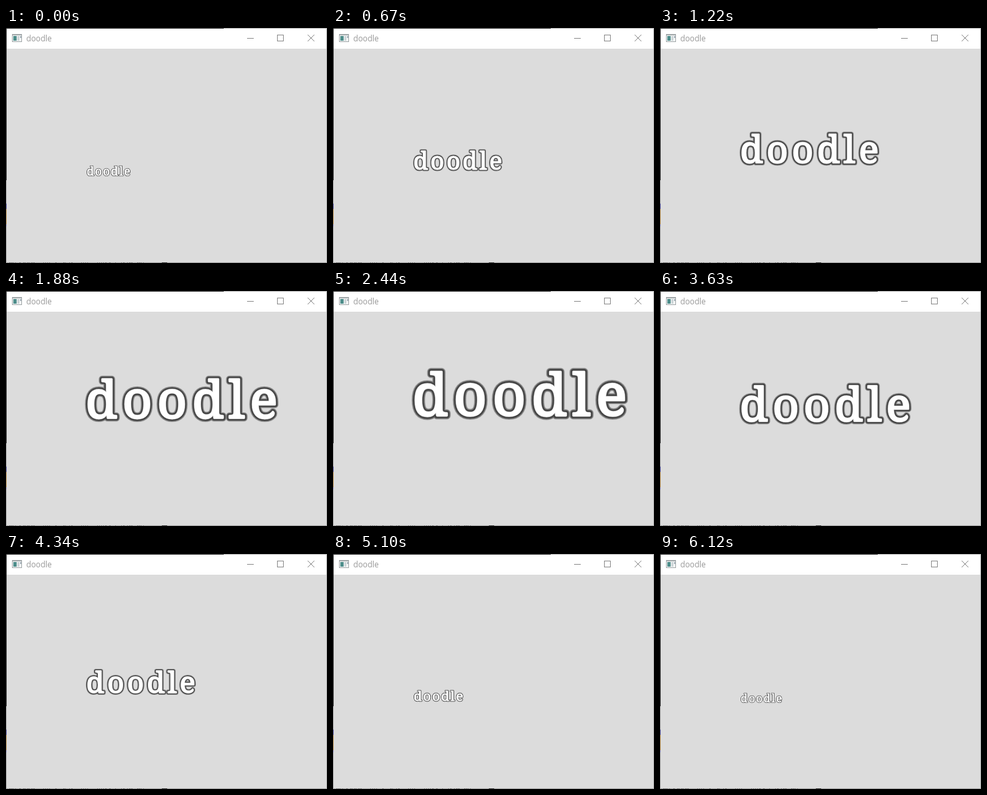
These frames come from a looping animation (482 px wide and 352 px high, 6.18 s). An HTML page with a canvas:

```html
<!DOCTYPE html>
<html lang="en">
<head>
<meta charset="utf-8">
<title>doodle</title>
<style>
  html, body { margin: 0; width: 100%; height: 100%; overflow: hidden; background: #dcdcdc; }
  canvas { display: block; }
</style>
</head>
<body>
<canvas id="stage" width="482" height="352"></canvas>
<script>
const ctx = document.getElementById("stage").getContext("2d");
const LOOP = 6180;
const EM = 87;          // font size at which the word is WORD_W wide
const WORD_W = 327;

// Bursts of evenly spaced redraws: start, end, count
const bursts = [
  [30, 620, 14], [670, 1270, 14], [1340, 1930, 13], [1960, 2540, 13], [2590, 3180, 13],
  [3280, 3880, 13], [3930, 4520, 13], [4570, 5150, 13], [5210, 5790, 12], [5830, 6120, 7]
];
const ticks = [0];
for (const [from, to, count] of bursts) {
  for (let i = 0; i < count; i++) {
    ticks.push(Math.round((from + (to - from) * i / (count - 1)) / 10) * 10);
  }
}

function rect(color, x, y, w, h) {
  ctx.fillStyle = color;
  ctx.fillRect(x, y, w, h);
}

function drawIcon() {
  rect("#a3a9ab", 9, 9, 15, 12);
  rect("#f4f6f6", 10, 11, 13, 9);
  rect("#4f8f8c", 11, 12, 5, 7);
  rect("#cdd5d8", 17, 12, 3, 7);
  rect("#a9b4bd", 21, 12, 2, 3);
}

function drawButtons() {
  rect("#8c8c8c", 362, 15, 10, 1);
  ctx.strokeStyle = "#8c8c8c";
  ctx.lineWidth = 1;
  ctx.strokeRect(407.5, 10.5, 9, 9);
  ctx.beginPath();
  ctx.moveTo(453, 10); ctx.lineTo(463, 20);
  ctx.moveTo(463, 10); ctx.lineTo(453, 20);
  ctx.stroke();
}

// Slivers of the desktop showing around the window
function drawEdges() {
  rect("#2b2b2b", 0, 0, 327, 1);
  rect("#b4b4b4", 327, 0, 155, 1);
  rect("#2b2b2b", 0, 0, 1, 228);
  rect("#a5a5a5", 0, 228, 1, 124);
  rect("#54549a", 0, 263, 1, 8);
  rect("#b08a50", 0, 271, 1, 23);
  rect("#8c8cc0", 0, 294, 1, 3);
  rect("#b0b0b0", 481, 0, 1, 352);
  rect("#a0a0a0", 0, 351, 482, 1);
  let seed = 7;
  for (let x = 2; x < 212; x += 3) {
    seed = (seed * 73 + 41) % 257;
    if (seed > 110) rect("#666", x, 351, 1 + seed % 2, 1);
  }
  rect("#333", 234, 351, 8, 1);
}

function drawWindow() {
  rect("#dcdcdc", 0, 0, 482, 352);
  rect("#fff", 0, 0, 482, 31);
  drawIcon();
  ctx.font = '11.8px "Open Sans", sans-serif';
  ctx.letterSpacing = "0px";
  ctx.fillStyle = "#999";
  ctx.fillText("doodle", 30.4, 20);
  drawButtons();
  drawEdges();
}

function strokeWord(color, lineWidth) {
  ctx.strokeStyle = color;
  ctx.lineWidth = lineWidth;
  ctx.strokeText("doodle", -2.5, 0);
}

function drawWord(time) {
  const width = 189 + 139 * Math.cos(2 * Math.PI * (time - 2610) / LOOP);
  const scale = width / WORD_W;
  ctx.save();
  ctx.translate(121.8, 230.5 - 0.1375 * width);
  ctx.scale(scale, scale);
  ctx.font = `${EM}px "Noto Serif", serif`;
  ctx.letterSpacing = "8.5px";
  ctx.lineJoin = "round";
  // Stacked strokes: dark near the letters, fading outwards
  for (let w = 12; w >= 5; w--) strokeWord("rgba(20, 20, 22, 0.2)", w);
  // White strokes thicken the letters and soften their edge
  strokeWord("rgba(255, 255, 255, 0.5)", 4);
  strokeWord("#fff", 2.6);
  ctx.fillStyle = "#fff";
  ctx.fillText("doodle", -2.5, 0);
  ctx.restore();
}

function frame(now) {
  const t = now % LOOP;
  drawWindow();
  drawWord(ticks.findLast(tick => tick <= t));
  requestAnimationFrame(() => frame(performance.now()));
}
frame(0);
</script>
</body>
</html>
```
